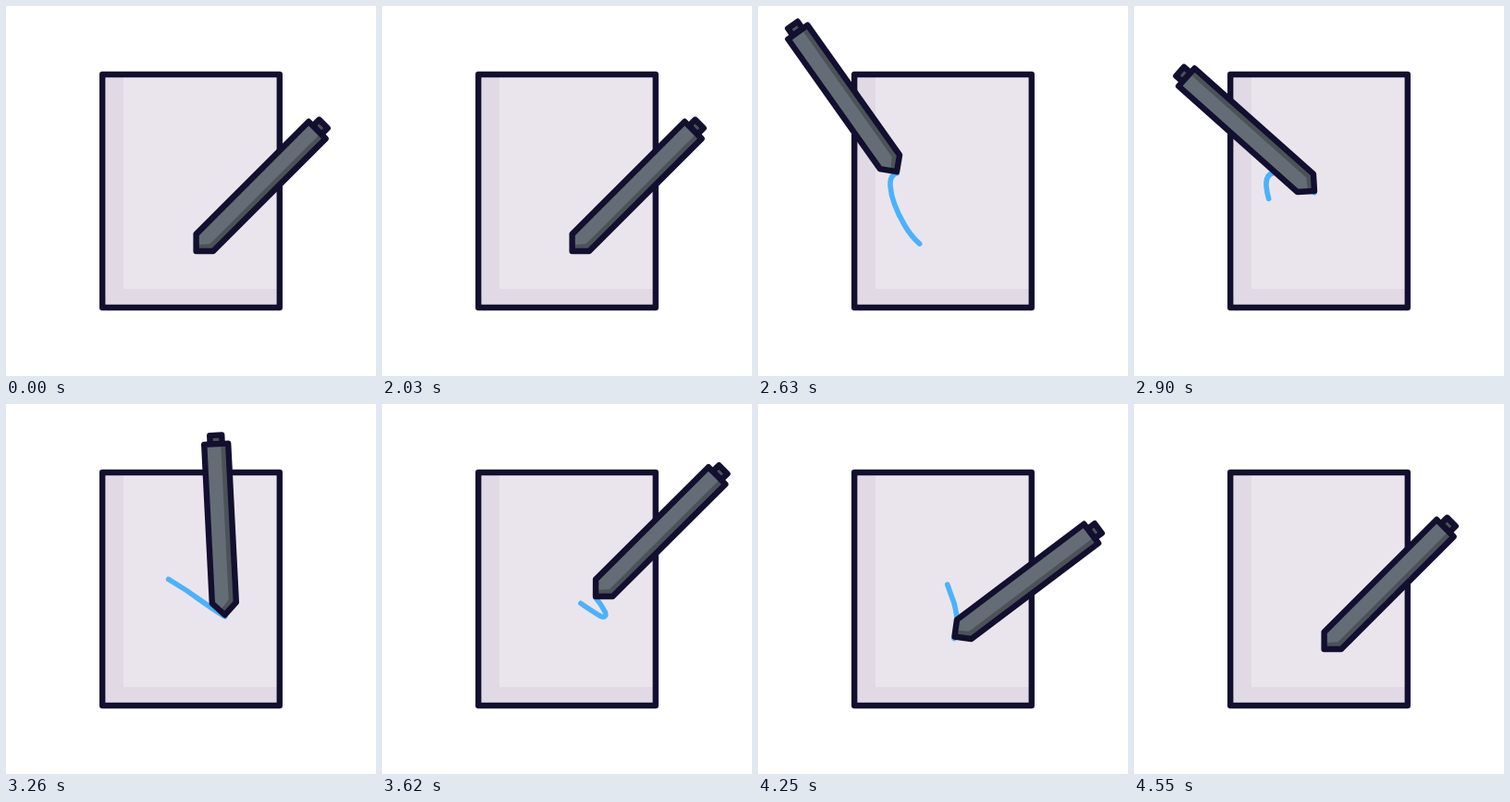
An HTML page for the animation above (4640 ms loop, 400x400 px).

```html
<!DOCTYPE html>
<html lang="en">
<head>
<meta charset="utf-8">
<title>Pen and paper</title>
<style>
  html, body { margin: 0; width: 100%; height: 100%; overflow: hidden; background: #fff; }
  svg { display: block; width: 100%; height: 100%; }
  .line { fill: none; stroke: #120f2f; stroke-width: 6.4; stroke-linejoin: round; }
  .shade { fill: #e1d9e4; }
  .dark { fill: #4b5359; }
  #trail { fill: none; stroke: #4ab2fb; stroke-width: 5.6; stroke-linecap: round; stroke-linejoin: round; }
</style>
</head>
<body>
<svg viewBox="0 0 400 400">
  <rect x="104" y="74" width="192" height="252" fill="#eae5ed"/>
  <path class="shade" d="M104 74H127V306H296V326H104Z"/>
  <rect class="line" x="104.2" y="74" width="191.6" height="252"/>
  <path id="trail" transform="translate(0 1.5)"/>
  <g id="pen">
    <path class="dark" d="M-6.5 -185V-194.5H6.5V-185Z"/>
    <path class="line" d="M-6.5 -185V-194.5H6.5V-185Z"/>
    <path fill="#646d75" d="M0 0L13 -13V-185H-13V-13Z"/>
    <path class="dark" d="M5 -185H13V-13L0 0L-5 -5L5 -16Z"/>
    <path class="line" d="M0 0L13 -13V-185H-13V-13Z"/>
  </g>
</svg>
<script>
const LOOP = 4640, START = 2030, END = 4550, STEP = 30;

// Legs of the scribble: when the pen, then the fading ink, reaches each end
const legs = [
  [START, 2430, 'M205.6 265'],
  [2420, 2740, 'C190 270 171 257 158.5 235.5'],
  [2555, 2980, 'C150 221 144 206 143 193'],
  [2900, 3420, 'C142 175 157 176 171 185L195 200'],
  [3260, 3830, 'C208 209 224 221 236.5 228'],
  [3620, 3960, 'C241 230 243 227 241 223Q237 215 231 208'],
  [4010, 4330, 'C226 200 210 172 204 170C197 168 199 176 201 182Q206 198 211.8 213'],
  [END, END, 'C222 252 208 257 203 261Q196 267 205.6 265']
];

// Pen swings: time, tilt, how early the swing gathers speed
const swings = [[START, 45, 0], [2860, -49, 0.14], [4000, 59, 0.45], [END, 45, 0]];

const pen = document.getElementById('pen');
const trail = document.getElementById('trail');

let d = '';
const lengths = legs.map(leg => {
  trail.setAttribute('d', d += leg[2]);
  return trail.getTotalLength();
});
const penTimes = legs.map(leg => leg[0]);
const inkTimes = legs.map(leg => leg[1]);

// Index of the span of times that holds t
function span(times, t) {
  let i = 0;
  while (i < times.length - 2 && times[i + 1] <= t) i++;
  return i;
}

const progress = (t, a, b) => Math.min(1, Math.max(0, (t - a) / (b - a)));

// Smooth distance along the scribble, at rest at both ends
function distance(times, t) {
  const slope = i => i > 0 && i < times.length - 1
    ? (lengths[i + 1] - lengths[i - 1]) / (times[i + 1] - times[i - 1]) : 0;
  const i = span(times, t), h = times[i + 1] - times[i];
  const u = progress(t, times[i], times[i + 1]), v = 1 - u;
  return v * v * (1 + 2 * u) * lengths[i] + u * u * (3 - 2 * u) * lengths[i + 1]
    + h * u * v * (v * slope(i) - u * slope(i + 1));
}

function tilt(t) {
  const i = span(swings.map(s => s[0]), t);
  const [t0, from] = swings[i], [t1, to, lead] = swings[i + 1];
  const u = progress(t, t0, t1);
  const eased = (1 - Math.cos(Math.PI * u * (1 + lead * (1 - u)))) / 2;
  return from + (to - from) * eased;
}

function draw(t) {
  const head = distance(penTimes, t), tail = distance(inkTimes, t);
  const tip = trail.getPointAtLength(head);
  pen.setAttribute('transform', `translate(${tip.x} ${tip.y}) rotate(${tilt(t)})`);
  trail.style.visibility = head - tail > 0.1 ? 'visible' : 'hidden';
  trail.style.strokeDasharray = `${Math.max(0, head - tail)} 999`;
  trail.style.strokeDashoffset = -tail;
}

function tick() {
  const t = performance.now() % LOOP;
  const stepped = START + STEP * Math.floor((t - START) / STEP);
  draw(Math.min(stepped, END));
  requestAnimationFrame(tick);
}
tick();
</script>
</body>
</html>
```
